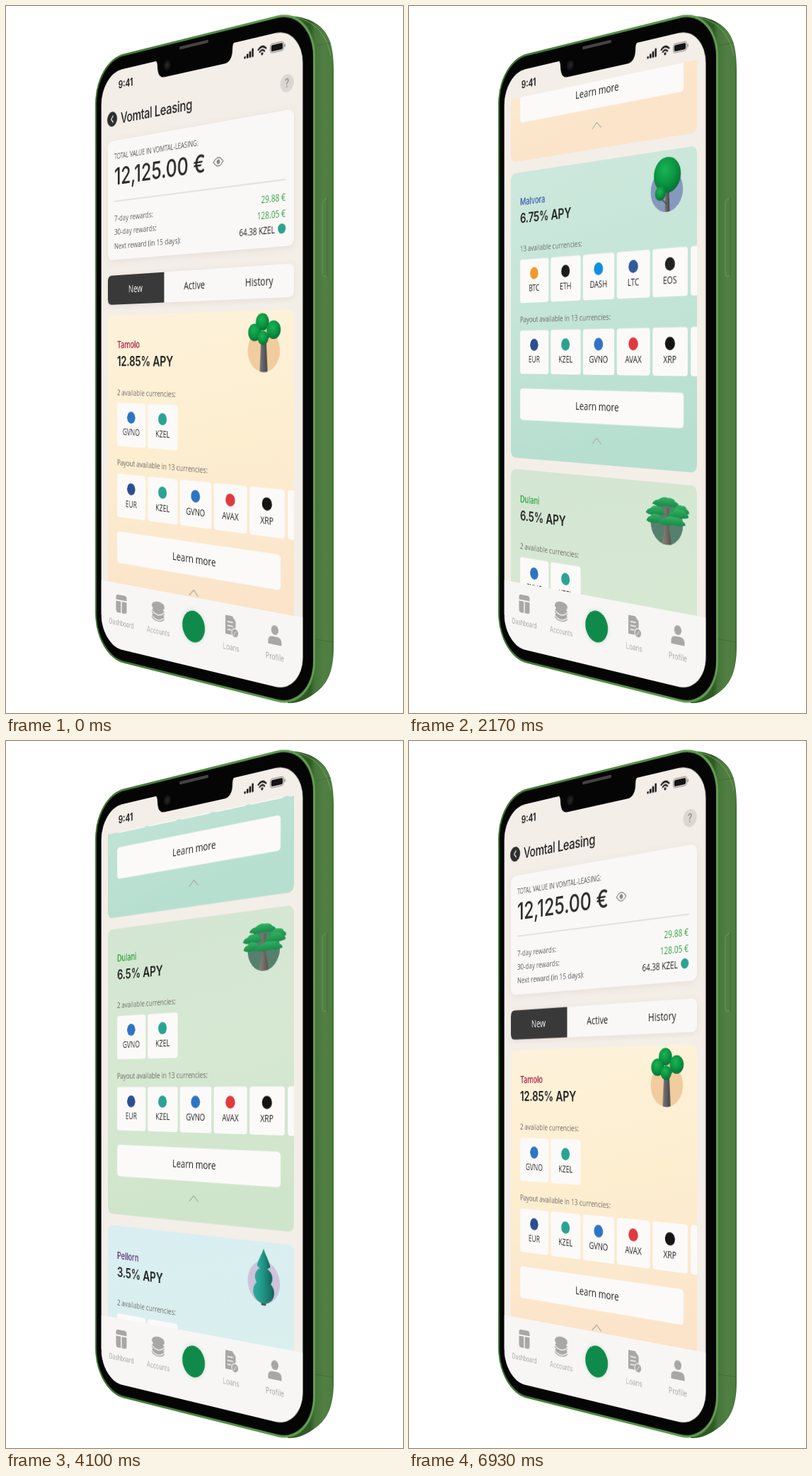
These frames come from a looping animation (561 px wide and 998 px high, 7000 ms). An HTML page:

```html
<!DOCTYPE html>
<html lang="en">
<head>
<meta charset="utf-8">
<title>Phone scroll</title>
<style>
html, body { margin: 0; width: 100%; height: 100%; overflow: hidden; background: #fff; }
#stage { position: relative; width: 100%; height: 100%; overflow: hidden; contain: strict; }
svg { position: absolute; left: 0; top: 0; display: block; }
/* Vertical lines stay vertical; horizontals converge at y = 495. */
#page {
  transform-origin: 0 0;
  transform: matrix3d(.60955, -.19404, 0, -.000392, 0, 1, 0, 0, 0, 0, 1, 0, 144, 0, 0, 1) translate(-30px, 70px);
}
text { font-family: "Open Sans", sans-serif; fill: #222; }
.ui { font-family: Inter, sans-serif; }
</style>
</head>
<body>
<div id="stage">
<svg width="561" height="998" viewBox="0 0 561 998">
  <defs>
    <linearGradient id="side" x1="430" x2="463" gradientUnits="userSpaceOnUse">
      <stop offset="0" stop-color="#2f5a25"/>
      <stop offset=".2" stop-color="#46763a"/>
      <stop offset=".6" stop-color="#527f44"/>
      <stop offset=".92" stop-color="#4c7d3e"/>
      <stop offset="1" stop-color="#3c6a2f"/>
    </linearGradient>
  </defs>
  <path fill="url(#side)" d="M375 18C395 12 418 13 437 24C456 36 463 54 463 90V905C463 940 454 957 438 969C425 979 412 985 398 984L380 500Z"/>
  <path fill="none" stroke="#6f9f5f" d="M400 14.500C432 18 452 36 459 70"/>
  <path fill="none" stroke="#7aa56b" stroke-opacity=".6" d="M453 271l-4 3q-2 2-2 5v97q0 5 2 6l4-1"/>
  <path fill="none" stroke="#365f2c" stroke-opacity=".5" d="M454 270V382M437 56l22-4M437 894l26 4"/>
</svg>
<svg id="page" width="410" height="860" viewBox="-30 70 410 860"></svg>
</div>
<script>
const CARD_TOP = 437, CARD_PITCH = 416, TILE_PITCH = 62.4;

const text = (x, y, str, size, attrs = '') =>
  `<text x="${x}" y="${y + size * .36}" font-size="${size}" ${attrs}>${str}</text>`;
const rect = (x, y, w, h, r, fill, attrs = '') =>
  `<rect x="${x}" y="${y}" width="${w}" height="${h}" rx="${r}" fill="${fill}" ${attrs}/>`;
const dot = (x, y, r, fill) => `<circle cx="${x}" cy="${y}" r="${r}" fill="${fill}"/>`;
const oval = (x, y, rx, ry, fill) => `<ellipse cx="${x}" cy="${y}" rx="${rx}" ry="${ry}" fill="${fill}"/>`;
const shape = (d, fill) => `<path d="${d}" fill="${fill}"/>`;
const line = (d, color, width = 1.5) =>
  `<path d="${d}" fill="none" stroke="${color}" stroke-width="${width}" stroke-linecap="round" stroke-linejoin="round"/>`;
const at = (x, y, body) => `<g transform="translate(${x} ${y})">${body}</g>`;
const gradient = (id, stops, kind = 'linear', attrs = 'x1="0" y1="0" x2=".15" y2="1"') =>
  `<${kind}Gradient id="${id}" ${attrs}>` +
  stops.map((c, i) => `<stop offset="${i / (stops.length - 1)}" stop-color="${c}"/>`).join('') +
  `</${kind}Gradient>`;

const MID = 'text-anchor="middle"', END = 'text-anchor="end"';

const coinColors = {
  GVNO: '#2d74c4', KZEL: '#2aa393', EUR: '#2b4f91', AVAX: '#e03a3e', XRP: '#141414',
  BTC: '#f3982a', ETH: '#1c1c1c', DASH: '#108ee2', LTC: '#345a9c', EOS: '#222'
};
const payout = ['EUR', 'KZEL', 'GVNO', 'AVAX', 'XRP'];
const stable = ['GVNO', 'KZEL'];

// A flat, bumpy foliage pad of half-width w.
const pad = (x, y, w) => at(x, y, shape(
  `M${-w} 3Q${-w * .9}-2 ${-w * .5}-3Q${-w * .2}-8 ${w * .2}-6Q${w * .6}-7 ${w * .75}-2Q${w}-1 ${w} 3Q${w * .5} 6 ${w * .1} 4Q${-w * .5} 7 ${-w} 3Z`,
  'url(#flatLeaf)'));

const trees = {
  round: shape('M-4-18H4L6.5 26Q0 28-6.5 26Z', 'url(#trunk)') + line('M-1-10L-14-22M1-10L15-24', '#57585a', 3) +
    dot(-2, -36, 11, 'url(#leaf)') + dot(-15, -23, 11, 'url(#leaf)') +
    dot(16.5, -26, 11.5, 'url(#leaf)') + dot(-1, -16, 9, 'url(#leaf)'),
  tall: shape('M-2-2H4L5 26Q1 27-3 26Z', 'url(#trunk)') + line('M0 17L-9 9', '#57585a', 2) +
    dot(1, -19.5, 22.5, 'url(#leaf)') + dot(-10.5, 3, 9, 'url(#leaf)'),
  flat: shape('M-3-20H4L4 4L8 26H-7L-3 4Z', 'url(#bark)') + line('M0 2L-18-10M2 0L20-12', '#6b645f', 3) +
    pad(-2, -26, 22) + pad(22, -18, 15) + pad(-19, -14, 16) + pad(19, -13, 17) + pad(-20, -4, 14) + pad(8, -3, 23),
  cone: rect(-4, 20, 8, 9, 1, '#555') +
    oval(0, 12, 17.5, 14.5, 'url(#teal)') + oval(0, -6, 14.5, 12, 'url(#teal)') +
    shape('M0-42C4-33 10-26 11-20Q0-11-11-20C-10-26-4-33 0-42Z', 'url(#teal)')
};

const cards = [
  { name: 'Tamolo', color: '#a3193b', rate: '12.85', coins: stable, tree: 'round', disc: '#f1cc9e', bg: ['#fdf2da', '#fdeed0', '#fbe4ca'] },
  { name: 'Malvora', color: '#3f5ca9', rate: '6.75', coins: ['BTC', 'ETH', 'DASH', 'LTC', 'EOS'], count: 13, tree: 'tall', disc: '#8798bd', bg: ['#cde8dc', '#c4e5d7', '#b7dfcf'] },
  { name: 'Dulani', color: '#30a43e', rate: '6.5', coins: stable, tree: 'flat', disc: '#55806d', bg: ['#d3e6d3', '#d6e8d2', '#cfe5cb'] },
  { name: 'Pellorn', color: '#5b2a74', rate: '3.5', coins: ['BTC', 'ETH'], tree: 'cone', disc: '#cfc3dc', bg: ['#d9eef1', '#d9f0ee', '#dbd9ea'] }
];

function tileRow(y, coins) {
  const tiles = coins.map((coin, i) => at(19.4 + TILE_PITCH * i, y,
    rect(0, 0, 58, 60.5, 4, '#fbfaf9') + dot(29, 20, 8.3, coinColors[coin]) +
    text(29, 40.5, coin, 12.2, MID)));
  const more = coins.length > 4 ? shape(`M342 ${y}h-6q-4 0-4 4v52.5q0 4 4 4h6z`, '#fbfaf9') : '';
  return tiles.join('') + more;
}

function card(c, i) {
  const faded = 'style="fill:#6c6c68"';
  return at(0, CARD_TOP + CARD_PITCH * i,
    rect(0, 0, 342, 400, 9, `url(#bg${i})`) +
    at(292.5, 50.5, dot(0, 0, 26.8, c.disc) + trees[c.tree]) +
    text(19.4, 41, c.name, 13.3, `class="ui" font-weight="500" style="fill:${c.color}"`) +
    text(19.4, 64.5, `${c.rate}% APY`, 19.2, 'class="ui" font-weight="600" letter-spacing="-.2"') +
    text(19.4, 107.4, `${c.count || 2} available currencies:`, 11.4, faded) +
    tileRow(122.5, c.coins) +
    text(19.4, 206.3, 'Payout available in 13 currencies:', 11.4, faded) +
    tileRow(221.7, payout) +
    rect(19.4, 302.5, 301, 44, 5, '#fbfaf9') +
    text(170, 324.2, 'Learn more', 14.9, `${MID} font-weight="500"`) +
    line('M162 373L170 365.5L178 373', '#a9aba5', 1.3));
}

function summary() {
  const row = (y, label, value, right, color) =>
    text(13.4, y + 1.5, label, 11.6, 'style="fill:#5c5b5a"') +
    text(right, y, value, 11.8, `${END} style="fill:${color}"`);
  return dot(9, 161, 10.4, '#2f2e2e') + line('M11 156.5L7 161L11 165.5', '#fff') +
    text(26.7, 161.8, 'Vomtal Leasing', 20, 'class="ui" font-weight="500" letter-spacing="-.4"') +
    dot(330.7, 159, 11, '#dcd7d3') + text(330.7, 159, '?', 14, `${MID} class="ui" font-weight="500" style="fill:#8f8b88"`) +
    rect(0, 192, 342, 167, 9, '#faf8f6', 'filter="url(#soft)"') +
    text(13.4, 214.5, 'TOTAL VALUE IN VOMTAL-LEASING:', 10.2, 'style="fill:#555"') +
    text(13.4, 242.4, '12,125.00 €', 33.2, 'class="ui" font-weight="500" style="fill:#2b2a2a"') +
    line('M206 243Q214.5 232 223 243Q214.5 254 206 243Z', '#8b8886', 1.4) + dot(214.5, 243, 3, '#8b8886') +
    line('M13.4 277H328.4', '#cfccc9', 1) +
    row(299, '7-day rewards:', '29.88 €', 328.4, '#2fa040') +
    row(318.5, '30-day rewards:', '128.05 €', 328.4, '#2fa040') +
    row(338, 'Next reward (in 15 days):', '64.38 KZEL', 311, '#222') + dot(322.3, 337, 6.3, coinColors.KZEL);
}

const tabs = () =>
  rect(0, 381, 342, 41, 8, '#faf8f6', 'filter="url(#soft)"') +
  shape('M114 381H8Q0 381 0 389V414Q0 422 8 422H114Z', '#3a3939') +
  ['New', 'Active', 'History'].map((name, i) =>
    text(57 + 114 * i, 401, name, 14, `${MID} font-weight="500" style="fill:${i ? '#222' : '#fff'}"`)).join('');

function statusBar() {
  const bars = [3, 5.5, 8, 11].map((h, i) => rect(259.5 + 4.4 * i, 117.5 - h, 3, h, .8, '#141414')).join('');
  return text(22, 114.6, '9:41', 15, 'class="ui" font-weight="600"') + bars +
    line('M283.5 110Q290 104 296.5 110M286 113.2Q290 109.6 294 113.2', '#141414', 2.2) + dot(290, 116, 1.8, '#141414') +
    rect(303.5, 106.5, 22, 11, 3, 'none', 'stroke="#8d8986"') + rect(305, 108, 19, 8, 2, '#141414') +
    rect(326.6, 110, 1.6, 4, .8, '#8d8986');
}

function navBar() {
  const grey = '#a9a7a5', paper = '#f8f6f4';
  const icons = [
    [28.2, 'Dashboard', rect(-11, -12, 22, 25, 4, grey) + line('M-11-4H11M0-4V13', paper, 2)],
    [102.3, 'Accounts', [8, 1, -7].map(y => oval(0, y, 12.5, 6, grey) +
      line(`M-12.5 ${y - 1}Q0 ${y + 9} 12.5 ${y - 1}`, paper, 1.4)).join('') + oval(0, -7, 12, 5, grey)],
    [237, 'Loans', shape('M-10-13H2L8-7V11H-10Z', grey) + line('M-6-5H3M-6 0H3M-6 5H0', paper, 1.4) +
      dot(7, 8, 6.5, paper) + dot(7, 8, 5.3, grey) + line('M5 10.5L9 5.5', paper, 1)],
    [311, 'Profile', dot(0, -6, 6, grey) + shape('M-11 12V9Q-11 2-4 2H4Q11 2 11 9V12Z', grey)]
  ];
  return rect(-15, 812, 372, 94, 0, paper) +
    icons.map(([x, label, icon]) => at(x, 840, icon) +
      text(x, 867.5, label, 10, `${MID} class="ui" style="fill:#aaa8a6"`)).join('') +
    dot(169.6, 850.6, 27, 'url(#halo)') + dot(169.6, 850.6, 20.8, '#0f8a4a');
}

document.getElementById('page').innerHTML = `<defs>
  ${cards.map((c, i) => gradient('bg' + i, c.bg)).join('')}
  ${gradient('leaf', ['#19b455', '#0c9843', '#066c31'], 'radial', 'cx=".42" cy=".35" r=".7"')}
  ${gradient('flatLeaf', ['#35b765', '#1a8a4a'])}
  ${gradient('teal', ['#2fae9b', '#1f9283', '#126458'], 'linear', '')}
  ${gradient('trunk', ['#77777a', '#454548'], 'linear', '')}
  ${gradient('bark', ['#8b827b', '#57504c'], 'linear', '')}
  ${gradient('rim', ['#3b7430', '#4e8a40', '#64a053'], 'linear', '')}
  ${gradient('halo', ['#bfe0cd', '#cfe5d8', '#e0ece4', '#f8f6f4'], 'radial', '')}
  <filter id="soft" x="-5%" y="-10%" width="110%" height="125%">
    <feDropShadow dx="0" dy="2" stdDeviation="4" flood-color="#80706a" flood-opacity=".13"/>
  </filter>
  <clipPath id="screen">${rect(-14.2, 94, 370, 810, 44, '#000')}</clipPath>
  <clipPath id="view">${rect(-15, 132, 372, 680, 0, '#000')}</clipPath>
</defs>
${rect(-27, 73, 402, 849, 60, 'url(#rim)')}
${rect(-24, 76, 396, 843, 57, '#050505')}
<g clip-path="url(#screen)">
  ${rect(-15, 93, 372, 812, 0, '#f4eee8')}
  <g clip-path="url(#view)"><g id="content">${summary()}${tabs()}${cards.map(card).join('')}</g></g>
  ${statusBar()}${navBar()}
</g>
${shape('M96 92H244Q239.5 95 239.5 101Q239.5 118 225 118H115Q101 118 101 101Q101 95 96 92Z', '#050505')}
${rect(143, 82, 54, 4, 2, '#474344')}${dot(120, 103, 6.5, '#17171b')}${dot(120, 103, 3, '#24242c')}`;

// Scroll keys: time in ms, offset, speed in px per ms.
const keys = [
  [0, 0, 0], [330, 0, 0], [1430, 267, .72], [2170, 616, .125], [2830, 644, 0], [3080, 644, 0],
  [3770, 764, .5], [4620, 1288, 0], [5510, 1288, 0], [6030, 946, -1.3], [6940, 0, 0], [7000, 0, 0]
];

function scrollAt(time) {
  const i = keys.findIndex(k => k[0] > time);
  const [t0, y0, v0] = keys[i - 1], [t1, y1, v1] = keys[i];
  const span = t1 - t0, p = (time - t0) / span, q = 1 - p;
  return q * q * (1 + 2 * p) * y0 + p * p * (3 - 2 * p) * y1 + span * p * q * (q * v0 - p * v1);
}

const content = document.getElementById('content');
const start = performance.now();
function draw() {
  const time = (performance.now() - start) % 7000;
  content.setAttribute('transform', `translate(0 ${-scrollAt(time).toFixed(2)})`);
  requestAnimationFrame(draw);
}
draw();
</script>
</body>
</html>
```
